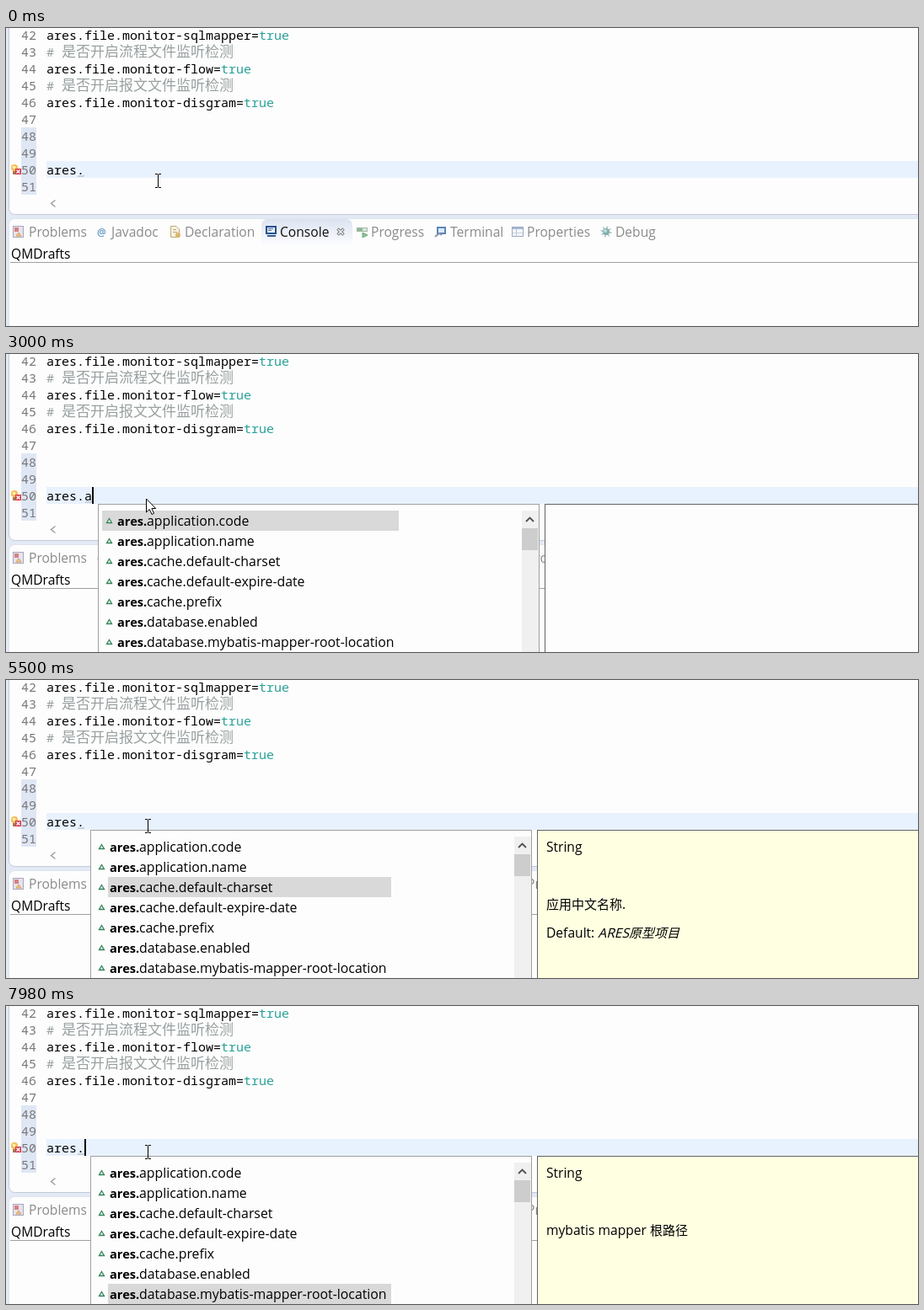
Animation of 1082 by 354 pixels, one loop 8000 ms. Source, as an HTML page with a canvas:

```html
<!DOCTYPE html>
<html lang="zh-CN">
<head>
<meta charset="utf-8">
<title>Property completion</title>
<style>
  html, body { margin: 0; width: 100%; height: 100%; overflow: hidden; background: #fff; }
  canvas { display: block; width: 1082px; height: 354px; }
</style>
</head>
<body>
<canvas id="stage" width="1082" height="354"></canvas>
<script>
const W = 1082, H = 354, LOOP = 8000, CHAR = 9;
const ctx = document.getElementById('stage').getContext('2d');

const CJK = '"Noto Sans CJK SC", "Noto Sans CJK", sans-serif';
const UI = '15.6px "Open Sans", "Noto Sans", sans-serif';
const UI_LIST = '15.83px "Open Sans", "Noto Sans", sans-serif';
const UI_BOLD = 'bold 14.6px "Open Sans", "Noto Sans", sans-serif';
const UI_CJK = '15px ' + CJK;
const CODE = '15px "Noto Sans Mono", monospace';
const CODE_CJK = '300 17px ' + CJK;

const LINES = [
  'ares.file.monitor-sqlmapper=true',
  '# 是否开启流程文件监听检测',
  'ares.file.monitor-flow=true',
  '# 是否开启报文文件监听检测',
  'ares.file.monitor-disgram=true'
];
const PROPOSALS = [
  'application.code', 'application.name', 'cache.default-charset',
  'cache.default-expire-date', 'cache.prefix', 'database.enabled',
  'database.mybatis-mapper-root-location'
];
const DOCS = {
  blank: [],
  code: ['String', '应用代码.', 'ares-archetype-project'],
  name: ['String', '应用中文名称.', 'ARES原型项目'],
  expire: ['int', '缓存默认过期时间，单位秒', '300'],
  mapper: ['String', 'mybatis mapper 根路径']
};

// Each step overrides the state left by the steps before it.
const START = { typed: 'ares.', caret: false, mouse: 'away', row: -1, doc: null };
const STEPS = [
  [500, { caret: true, mouse: 'beam' }],
  [990, { caret: false }],
  [1490, { typed: 'ares', caret: true }],
  [2010, { typed: 'ares.', row: 0 }],
  [2510, { typed: 'ares.a' }],
  [3000, { mouse: 'arrow', doc: 'blank' }],
  [3500, { typed: 'ares.', mouse: 'beam', doc: null }],
  [4000, { mouse: 'arrow', doc: 'blank' }],
  [4500, { mouse: 'beam', doc: 'code' }],
  [5000, { caret: false, row: 1 }],
  [5500, { row: 2, doc: 'name' }],
  [6000, { caret: true, row: 3 }],
  [6500, { caret: false, doc: 'expire' }],
  [7010, { caret: true, row: 5 }],
  [7490, { caret: false, row: 6 }],
  [7980, { caret: true, doc: 'mapper' }]
];

function stateAt(t) {
  const s = { ...START };
  for (const [at, change] of STEPS) if (t >= at) Object.assign(s, change);
  return s;
}

function rect(x, y, w, h, color) {
  ctx.fillStyle = color;
  ctx.fillRect(x, y, w, h);
}

function frame(x, y, w, h, color) {
  ctx.strokeStyle = color;
  ctx.lineWidth = 1;
  ctx.strokeRect(x + 0.5, y + 0.5, w - 1, h - 1);
}

function path(points, color, width = 1, fill) {
  ctx.beginPath();
  points.forEach(([x, y], i) => i ? ctx.lineTo(x, y) : ctx.moveTo(x, y));
  if (fill) {
    ctx.closePath();
    ctx.fillStyle = fill;
    ctx.fill();
  }
  ctx.strokeStyle = color;
  ctx.lineWidth = width;
  ctx.stroke();
}

function disc(x, y, r, color) {
  ctx.beginPath();
  ctx.arc(x, y, r, 0, 7);
  ctx.fillStyle = color;
  ctx.fill();
}

function text(str, x, y, font, color) {
  ctx.font = font;
  ctx.fillStyle = color;
  ctx.fillText(str, x, y);
  return x + ctx.measureText(str).width;
}

// Latin and Chinese runs use their own fonts.
function mixed(str, x, y, latin, cjk, color) {
  for (const run of str.match(/[\u3000-\uffef]+|[^\u3000-\uffef]+/g))
    x = text(run, x, y, run.charCodeAt(0) >= 0x3000 ? cjk : latin, color);
  return x;
}

function slanted(str, x, y) {
  ctx.save();
  ctx.transform(1, 0, -0.25, 1, x, y);
  mixed(str, 0, 0, UI, UI_CJK, '#000');
  ctx.restore();
}

function panel(x, y, w, h, radii, border) {
  ctx.beginPath();
  ctx.roundRect(x + 0.5, y + 0.5, w, h, radii);
  ctx.fillStyle = '#fdfdfd';
  ctx.fill();
  ctx.strokeStyle = border;
  ctx.lineWidth = 1;
  ctx.stroke();
}

function drawMarker() {
  disc(10, 166, 4, '#f3b94f');
  disc(9.5, 165.5, 2, '#ffeeb0');
  rect(8, 170, 4, 4, '#9c8052');
  rect(11, 167, 7, 7, '#d8394a');
  path([[12.5, 168.5], [16.5, 172.5]], '#fff', 1.2);
  path([[16.5, 168.5], [12.5, 172.5]], '#fff', 1.2);
}

function drawEditor({ typed, caret }) {
  panel(3, -10, 1100, 231, [0, 0, 0, 7], '#c3c9d6');
  rect(18, 118, 18, 80, '#dfe6f4');
  rect(48, 158, W, 20, '#e8f2fe');
  for (let n = 42; n <= 51; n++) text(String(n), 18, 14 + (n - 42) * 20, CODE, '#787878');
  LINES.forEach((line, i) => {
    const y = 14 + i * 20, [key, value] = line.split('=');
    if (!value) return mixed(line, 48, y, CODE, CODE_CJK, '#98a0a0');
    const x = text(key + '=', 48, y, CODE, '#000');
    text(value, x, y, CODE, '#2aa198');
  });
  drawMarker();
  text(typed, 48, 174, CODE, '#000');
  const end = 48 + typed.length * CHAR;
  for (let i = 0; i < 8; i++) rect(end - 8 + i, 176 - Math.abs(i % 4 - 2) % 2, 1, 1, '#a9adb2');
  if (caret) rect(end, 158, 2, 20, '#000');
  path([[58.5, 204.5], [53.5, 208.5], [58.5, 212.5]], '#a0a0a0', 1.5);
}

const ICONS = {
  problems() {
    rect(8, 235, 13, 14, '#e5e3ef');
    frame(8, 235, 13, 14, '#a9a5bd');
    rect(10, 237, 5, 5, '#d98080');
    path([[12, 247], [15, 243], [18, 247]], '#d7a05c', 1, '#edc985');
  },
  javadoc() { text('@', 108, 247, 'bold 12px "Open Sans", sans-serif', '#75a5c9'); },
  declaration() {
    path([[195.5, 235.5], [202, 235.5], [205.5, 239], [205.5, 248.5], [195.5, 248.5]], '#bda878', 1, '#f8f2df');
    rect(198, 239, 4, 1, '#b5a779');
    rect(198, 242, 5, 1, '#b5a779');
    disc(204, 246, 3, '#d9b86c');
  },
  console() {
    rect(308, 235, 13, 10, '#24528d');
    rect(310, 237, 9, 6, '#eaf3ff');
    rect(311, 238, 6, 1, '#526f98');
    rect(311, 240, 4, 1, '#526f98');
    rect(310, 246, 10, 2, '#355e91');
  },
  progress() {
    rect(416, 237, 13, 5, '#d8e7dc');
    frame(416, 237, 13, 5, '#a4b5a9');
    rect(417, 238, 6, 3, '#88ba91');
    path([[423, 243], [429, 246], [423, 249]], '#6faa79', 1, '#8bc094');
  },
  terminal() {
    rect(511, 236, 11, 9, '#5b85b8');
    rect(513, 238, 7, 5, '#dceaff');
    path([[509, 248], [514, 244], [517, 246]], '#8b93a5', 2);
  },
  properties() {
    rect(600, 236, 14, 12, '#f4f7fb');
    rect(600, 236, 14, 3, '#a5b7d2');
    frame(600, 236, 14, 12, '#9daac0');
    rect(605, 239, 1, 9, '#b9c4d5');
    rect(601, 243, 12, 1, '#cbd3df');
  },
  debug() {
    for (let i = 0; i < 4; i++) {
      const a = i * Math.PI / 4 + 0.2, dx = 6.5 * Math.cos(a), dy = 6.5 * Math.sin(a);
      path([[712 - dx, 242 - dy], [712 + dx, 242 + dy]], '#739ba2');
    }
    disc(712, 242, 4, '#82aeb0');
    disc(711, 241, 2, '#c3dcda');
  }
};
const TABS = { Problems: 27, Javadoc: 125, Declaration: 212, Console: 325, Progress: 433,
  Terminal: 527, Properties: 618, Debug: 723 };

function drawViews() {
  panel(3, 226, 1100, 140, [7, 0, 0, 0], '#dfe4ee');
  const shade = ctx.createLinearGradient(0, 227, 0, 256);
  shade.addColorStop(0, '#dce3f1');
  shade.addColorStop(1, '#fafbfd');
  ctx.fillStyle = shade;
  ctx.beginPath();
  ctx.roundRect(303, 227, 108, 30, [7, 7, 0, 0]);
  ctx.fill();
  for (const [label, x] of Object.entries(TABS)) {
    ICONS[label.toLowerCase()]();
    text(label, x, 248, UI, label === 'Console' ? '#101010' : '#8b8b8b');
  }
  path([[393.5, 238.5], [400.5, 245.5]], '#777', 3.4);
  path([[400.5, 238.5], [393.5, 245.5]], '#777', 3.4);
  path([[394, 239], [400, 245]], '#f5f7fb', 1.5);
  path([[400, 239], [394, 245]], '#f5f7fb', 1.5);
  text('QMDrafts', 6, 274, UI, '#000');
  rect(5, 278, W, 1, '#a0a0a0');
}

function drawProposals(row) {
  rect(100, 178, 524, 200, '#fdfdfd');
  frame(100, 178, 524, 200, '#a0a0a0');
  const left = row ? 121 : 105;
  rect(left, 186 + row * 24, 457 - left, 24, '#d9d9d9');
  PROPOSALS.forEach((name, i) => {
    const y = 204 + i * 24;
    path([[113.5, y - 8.5], [116.5, y - 3.5], [110.5, y - 3.5], [113.5, y - 8.5]], '#35845b', 1.3, '#e6f5eb');
    text('ares.', 123, y, UI_BOLD, '#000');
    text(name, 158, y, UI_LIST, '#000');
  });
  rect(603, 186, 20, 168, '#f0f0f0');
  rect(603, 207, 19, 26, '#cdcdcd');
  path([[608, 199], [612.5, 194.5], [617, 199]], '#505050', 1.8);
}

function drawDoc(name) {
  const [type, summary, value] = DOCS[name];
  rect(630, 178, 500, 200, type ? '#ffffe1' : '#fdfdfd');
  frame(630, 178, 500, 200, '#646464');
  if (!type) return;
  text(type, 641, 204, UI, '#000');
  mixed(summary, 641, 272, UI, UI_CJK, '#000');
  if (value) slanted(value, text('Default: ', 641, 306, UI, '#000'), 306);
}

function drawBeam(x, y) {
  rect(x, y - 7, 1, 15, '#000');
  for (const dy of [-8, 8]) {
    rect(x - 3, y + dy, 3, 1, '#000');
    rect(x + 1, y + dy, 3, 1, '#000');
  }
}

function drawArrow(x, y) {
  path([[0, 0], [0, 16], [3.8, 12.5], [6.5, 18.5], [9, 17.3], [6.4, 11.5], [11.2, 11.5], [0, 0]]
    .map(([dx, dy]) => [x + dx, y + dy]), '#000', 1, '#fff');
}

function draw(t) {
  const s = stateAt(t);
  rect(0, 0, W, H, '#e3e9f5');
  drawEditor(s);
  drawViews();
  if (s.row >= 0) {
    ctx.save();
    ctx.translate((s.typed.length - 5) * CHAR, 0);
    drawProposals(s.row);
    if (s.doc) drawDoc(s.doc);
    ctx.restore();
  }
  if (s.mouse === 'arrow') drawArrow(166.5, 172);
  else if (s.mouse === 'beam') drawBeam(168, 173);
  else drawBeam(180, 181);
}

const began = performance.now();
function tick() {
  draw((performance.now() - began) % LOOP);
  requestAnimationFrame(tick);
}
tick();
</script>
</body>
</html>
```
